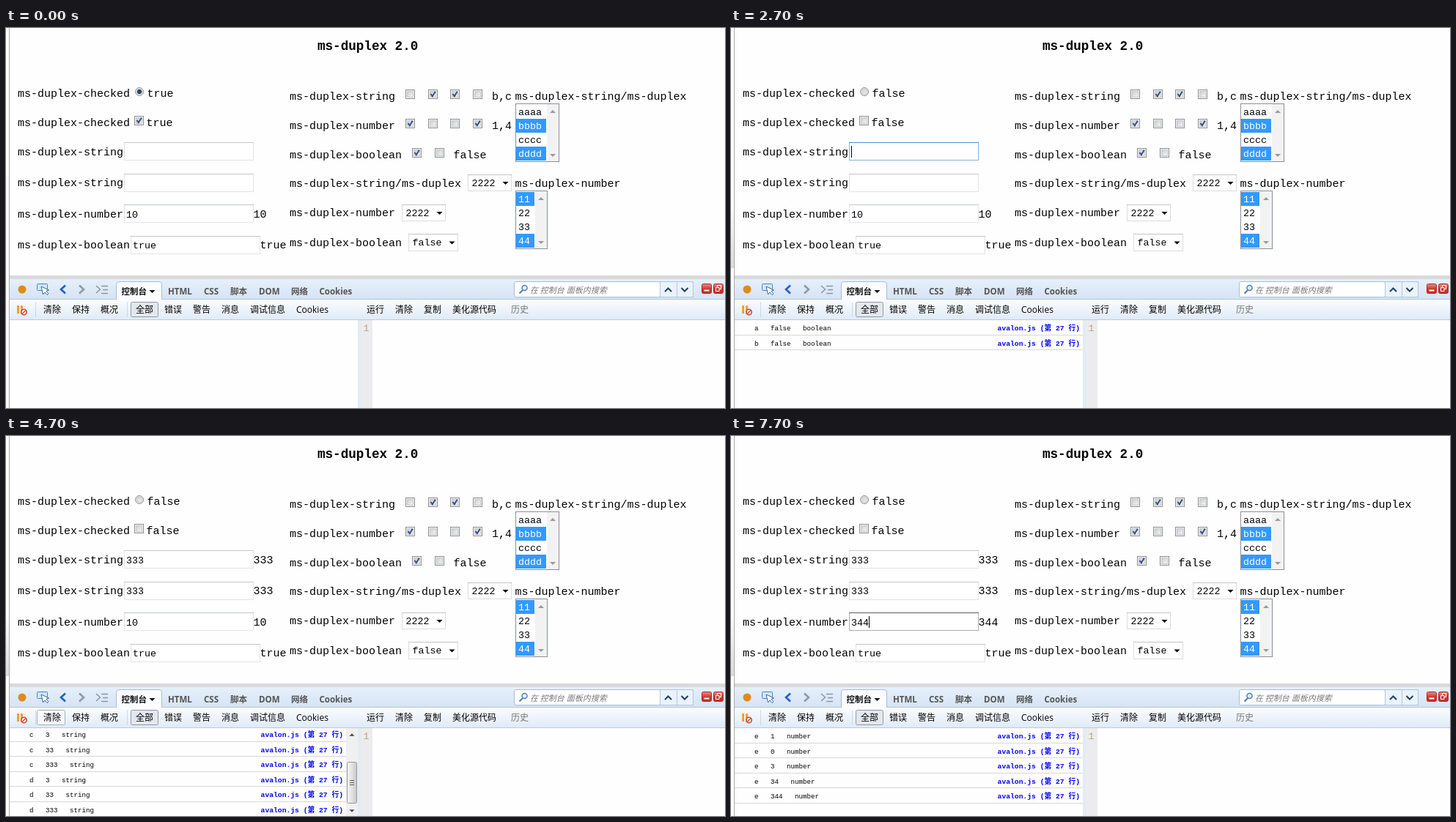
Write an HTML page that moves like this. It is 981 px wide and 519 px high and loops after 8000 ms.

```html
<!DOCTYPE html>
<html lang="en">
<head>
<meta charset="utf-8">
<title>ms-duplex 2.0</title>
<style>
  html, body { margin: 0; width: 100%; height: 100%; overflow: hidden; background: #fefefe; }
  svg { display: block; }
  text { white-space: pre; fill: #000; }
  .page { font: 15px "Liberation Mono", monospace; }
  .title { font: bold 17.6px "Liberation Mono", monospace; }
  .field { font: 13.33px "Liberation Mono", monospace; }
  .log { font: 9.17px "Liberation Mono", monospace; }
  .link { font: bold 9.7px "Liberation Mono", "Noto Sans CJK SC", monospace; fill: #00f; text-anchor: end; }
  .ui { font: 12px "Open Sans", "Noto Sans CJK SC", sans-serif; }
  .tab { font: bold 11.5px "Open Sans", "Noto Sans CJK SC", sans-serif; fill: #555; }
  .open { fill: #111; }
  .hint { font: italic 11px "Open Sans", "Noto Sans CJK SC", sans-serif; fill: #777; }
  .pick { fill: #fff; }
  .dim { fill: #777; }
  .num { fill: #c8a678; }
</style>
</head>
<body>
<svg id="stage" width="981" height="519" viewBox="0 0 981 519">
  <defs>
    <linearGradient id="tabs" x2="0" y2="1"><stop stop-color="#e6f0fb"/><stop offset="1" stop-color="#d5e3f4"/></linearGradient>
    <linearGradient id="tools" x2="0" y2="1"><stop stop-color="#fafcff"/><stop offset="1" stop-color="#dfeaf7"/></linearGradient>
    <linearGradient id="thumb"><stop stop-color="#f5f5f5"/><stop offset=".5" stop-color="#e2e2e2"/><stop offset="1" stop-color="#c8c8c8"/></linearGradient>
    <linearGradient id="box" x2="1" y2="1"><stop stop-color="#c9ccd1"/><stop offset="1" stop-color="#f6f6f6"/></linearGradient>
    <linearGradient id="hot" x2="1" y2="1"><stop stop-color="#b4def8"/><stop offset="1" stop-color="#eef9ff"/></linearGradient>
    <linearGradient id="down" x2="1" y2="1"><stop stop-color="#7fb6d8"/><stop offset="1" stop-color="#c9e6f6"/></linearGradient>
    <linearGradient id="red" x2="0" y2="1"><stop stop-color="#ee8d84"/><stop offset=".5" stop-color="#d33a31"/><stop offset="1" stop-color="#c22c28"/></linearGradient>
    <linearGradient id="edge" x2="0" y2="1"><stop stop-color="#fefefe"/><stop offset="1" stop-color="#dcdcdc"/></linearGradient>
    <clipPath id="console"><rect x="5" y="399" width="475" height="120"/></clipPath>
  </defs>
  <g id="still"></g>
  <g id="live"></g>
</svg>
<script>
const LOOP = 8000;

// drawing helpers
const rect = (x, y, w, h, fill, stroke, r = 0) =>
  `<rect x="${x}" y="${y}" width="${w}" height="${h}" rx="${r}" fill="${fill}" stroke="${stroke || 'none'}"/>`;
const frame = (x, y, w, h, fill, stroke, r) => rect(x + .5, y + .5, w - 1, h - 1, fill, stroke, r);
const disc = (cx, cy, r, fill, stroke = 'none', width = 1) =>
  `<circle cx="${cx}" cy="${cy}" r="${r}" fill="${fill}" stroke="${stroke}" stroke-width="${width}"/>`;
const path = (d, stroke, width = 1, fill = 'none') =>
  `<path d="${d}" fill="${fill}" stroke="${stroke}" stroke-width="${width}"/>`;
const text = (x, y, str, cls = 'page') => `<text x="${x}" y="${y}" class="${cls}">${str}</text>`;
const arrow = (x, y, size, fill, dir = 1) =>
  path(`M${x - size} ${y - dir * size / 2}h${2 * size}l${-size} ${dir * size}z`, 'none', 0, fill);
const dots = (x, y1, y2) => `<path d="M${x} ${y1}V${y2}" stroke="#a9bacd" stroke-dasharray="1 1"/>`;

const FILLS = ['url(#box)', 'url(#hot)', 'url(#down)'];

function checkbox(cx, cy, on, heat = 0) {
  return frame(cx - 6.5, cy - 6.5, 13, 13, '#f4f4f4', heat ? '#4c8fb8' : '#8e8f8f')
    + frame(cx - 4.5, cy - 4.5, 9, 9, FILLS[heat], heat ? '#8cc4e6' : '#c4c8cc')
    + (on ? path(`M${cx - 3} ${cy - .5}l2.3 3.2l4 -6.4`, '#3a4c86', 2) : '');
}

function radio(cx, cy, on, heat) {
  return disc(cx, cy, 5.5, '#f4f4f4', heat ? '#3f83ad' : '#8e8f8f')
    + disc(cx, cy, 3.9, FILLS[heat], heat ? '#8cc4e6' : '#c4c8cc')
    + (on ? disc(cx, cy, 2.6, heat ? '#2b86b5' : '#23506f', '#16374f') : '');
}

function input(x, y, [top, side]) {
  return frame(x, y, 177, 25, '#fff', side) + path(`M${x} ${y + .5}h177`, top);
}

function select(x, y, w, h, value) {
  return frame(x, y, w, h, '#fff', '#dcdcdc') + path(`M${x} ${y + .5}h${w}`, '#c4c4c4')
    + text(x + 5.5, y + 16, value, 'field') + arrow(x + w - 8.5, y + h / 2 + .5, 4, '#000');
}

function list(x, y, w, items, picked) {
  const bar = x + w - 17;
  return frame(x, y, w, 80, '#fff', '#8a8f98') + rect(bar, y + 1, 16, 78, '#f2f2f2')
    + arrow(bar + 8, y + 11, 4, '#999', -1) + arrow(bar + 8, y + 71, 4, '#999')
    + items.map((s, i) => (picked.includes(i) ? rect(x + 1, y + 2 + 19 * i, w - 19, 19, '#39f') : '')
      + text(x + 4, y + 16 + 19 * i, s, picked.includes(i) ? 'field pick' : 'field')).join('');
}

const PLAIN = ['#c4c6c9', '#e2e3ea'];

function pageArea() {
  const labels = [
    [16, 94, 'checked'], [16, 134, 'checked'], [16, 174, 'string'], [16, 216, 'string'],
    [16, 259, 'number'], [16, 301, 'boolean'],
    [387, 98, 'string'], [387, 138, 'number'], [387, 178, 'boolean'],
    [387, 217, 'string/ms-duplex'], [387, 257, 'number'], [387, 298, 'boolean'],
    [694.5, 98, 'string/ms-duplex'], [694.5, 217, 'number']
  ];
  const boxes = [
    [[551.5, 582.5, 612.5, 643.5], 90.5, [1, 2]],
    [[551.5, 582.5, 612.5, 643.5], 130.5, [0, 3]],
    [[560.5, 591.5], 170.5, [0]]
  ];
  return text(425, 30, 'ms-duplex 2.0', 'title')
    + labels.map(([x, y, s]) => text(x, y, 'ms-duplex-' + s)).join('')
    + boxes.map(([xs, y, on]) => xs.map((x, i) => checkbox(x, y, on.includes(i))).join('')).join('')
    + text(663, 98, 'b,c') + text(663, 138, '1,4') + text(610.5, 178, 'false')
    + input(170, 284, PLAIN) + text(173, 301, 'true', 'field') + text(346.5, 301, 'true')
    + select(630, 200, 60, 23, '2222') + select(540, 241, 60, 23, '2222') + select(549, 281, 68, 24, 'false')
    + list(695, 103, 60, ['aaaa', 'bbbb', 'cccc', 'dddd'], [1, 3])
    + list(695, 222, 44, ['11', '22', '33', '44'], [0, 3]);
}

function tabBar() {
  const tabs = [[221, 'HTML'], [270, 'CSS'], [306, '脚本'], [345, 'DOM'], [389, '网络'], [427.5, 'Cookies']];
  const navy = '#1f3f66', slate = '#8b96a3';
  return rect(5, 338, 976, 5, '#d9d9d9') + rect(5, 343, 976, 28, 'url(#tabs)')
    + path('M5 370.5H981', '#b3c6dc')
    + path('M150.5 371V350q0 -3.5 3.5 -3.5h55q3.5 0 3.5 3.5V371', '#a9bdd4', 1, '#fafcff')
    + disc(22, 357, 5.5, '#e08a1e')
    + frame(42, 349, 15, 10, '#d3e6f8', '#4b83bf', 1)
    + path('M48 353l2.5 11l2.5 -3l3 3.5l2 -1.7l-3 -3.5l3.5 -1.3z', '#2b69ae', 1, '#fff')
    + path('M81 351.5l-6 5.5l6 5.5', '#1f5fc0', 2.6)
    + path('M100 351.5l6 5.5l-6 5.5', '#8f9aa8', 2.6)
    + path('M123 352l5.5 5l-5.5 5', slate, 1.5)
    + path('M130 352.5h9M132 357.5h7M130 362.5h9', slate, 1.3)
    + text(157.5, 364, '控制台', 'tab open') + arrow(199.5, 360, 4, '#111')
    + tabs.map(([x, s]) => text(x, 364, s, 'tab')).join('')
    + frame(693, 346, 200, 22, '#fff', '#a9bdd3', 2)
    + disc(707.5, 355, 3.5, '#e6f2fd', '#4b7fb8', 1.5) + path('M705 358l-4.5 4.5', '#4b7fb8', 2)
    + text(715, 361.5, '在 控制台 面板内搜索', 'hint')
    + frame(892, 346, 24, 22, '#eaf2fb', '#b4c6da') + frame(915, 346, 23, 22, '#eaf2fb', '#b4c6da')
    + path('M899 360l4.5 -4.5l4.5 4.5', navy, 2) + path('M921.5 355l4.5 4.5l4.5 -4.5', navy, 2)
    + frame(949, 349, 14, 14, 'url(#red)', '#a82a28', 2) + path('M952.5 358.5h7', '#fff', 2)
    + frame(965, 349, 14, 14, 'url(#red)', '#a82a28', 2)
    + path('M970.5 354v-2.5h5v5h-2.5M968.5 354.5h4.5v5h-4.5z', '#fff');
}

function toolBar() {
  const items = [[90, '保持'], [129, '概况'], [216, '错误'], [255, '警告'], [294, '消息'],
    [333, '调试信息'], [396, 'Cookies'], [492, '运行'], [531, '清除'], [570, '复制'], [609, '美化源代码']];
  return rect(5, 371, 976, 28, 'url(#tools)') + path('M5 398.5H981', '#b9cbe0')
    + rect(15, 379, 3, 11, '#f0a22e') + rect(20, 379, 3, 11, '#f0a22e')
    + disc(24.5, 388, 3.7, '#fff', '#d8432e', 1.6) + path('M22 390.5l5 -5', '#d8432e', 1.5)
    + dots(40.5, 375, 395) + dots(165.5, 375, 395)
    + frame(170, 374, 38, 21, '#e3e8ee', '#8f9ba8', 2) + text(177, 389, '全部', 'ui')
    + items.map(([x, s]) => text(x, 389, s, 'ui')).join('') + text(689, 389, '历史', 'ui dim')
    + rect(480, 399, 501, 120, '#fefefe') + rect(480, 399, 4, 120, '#e3ebf4') + rect(484, 399, 16, 120, '#ececee')
    + text(487.5, 414, '1', 'field num');
}

const LOG = ['a false boolean', 'b false boolean', 'c 3 string', 'c 33 string', 'c 333 string',
  'd 3 string', 'd 33 string', 'd 333 string',
  'e 1 number', 'e 0 number', 'e 3 number', 'e 34 number', 'e 344 number'].map(s => s.split(' '));

function consoleArea(from, to) {
  const rows = LOG.slice(from, to), total = rows.length * 20.5;
  const scroll = Math.max(0, total - 121), right = scroll ? 464 : 480;
  const lines = rows.map(([key, value, type], i) => {
    const top = 399 + 20.5 * i - scroll, base = Math.round(top) + 14;
    return text(32, base, key, 'log') + text(54, base, value, 'log')
      + text(70.5 + 5.5 * value.length, base, type, 'log')
      + text(right - 4, base, 'avalon.js (第 27 行)', 'link')
      + path(`M5 ${Math.floor(top) + 20.5}H${right}`, '#d7d7d7');
  }).join('');
  const size = Math.round(86 * 109 / total);
  const bar = scroll ? rect(464, 399, 16, 120, '#f0f0f0')
    + arrow(472, 408, 3.5, '#444', -1) + arrow(472, 512, 3.5, '#444')
    + frame(465, 502 - size, 14, size, 'url(#thumb)', '#979797', 2)
    + [-3, 0, 3].map(d => path(`M469 ${Math.round(502 - size / 2) + d - .5}h6`, '#555')).join('') : '';
  return `<g clip-path="url(#console)">${lines}${bar}</g>`;
}

// input borders: [top, other sides]
const BLUE = ['#4a8fc9', '#86b4da'], DEEP = ['#3d7bad', '#569de5'];
const GREY = ['#929292', '#c0c0c0'], DARK = ['#5e5e5e', '#adadad'];

// each step changes part of the state and holds until the next one
const STEPS = [
  [0, { radio: 1, radioHeat: 0, check: 1, checkHeat: 0, values: ['', '', '10'],
        focus: -1, ring: PLAIN, caret: -1, from: 0, to: 0, clear: 0 }],
  [1100, { radioHeat: 1 }],
  [1300, { radio: 0, to: 1 }],
  [1500, { radioHeat: 0 }],
  [1600, { checkHeat: 1 }],
  [1900, { checkHeat: 2 }],
  [2000, { check: 0, checkHeat: 1, to: 2 }],
  [2200, { checkHeat: 0 }],
  [2700, { focus: 0, caret: 0, ring: BLUE }],
  [2800, { ring: DEEP }],
  [3000, { values: ['3', '', '10'], to: 3 }],
  [3200, { values: ['33', '', '10'], to: 4 }],
  [3400, { values: ['333', '', '10'], to: 5 }],
  [3500, { ring: BLUE }],
  [3600, { focus: 1, caret: 1, ring: PLAIN }],
  [3700, { ring: GREY }],
  [3800, { values: ['333', '3', '10'], ring: DARK, to: 6 }],
  [4000, { values: ['333', '33', '10'], to: 7 }],
  [4200, { values: ['333', '333', '10'], to: 8 }],
  [4300, { ring: GREY }],
  [4400, { ring: PLAIN }],
  [4600, { caret: -1 }],
  [4700, { clear: 1 }],
  [5100, { clear: 2, caret: 1 }],
  [5200, { clear: 0, from: 8 }],
  [5500, { focus: 2, caret: 2, ring: GREY }],
  [5700, { ring: DARK }],
  [6100, { values: ['333', '333', '1'], to: 9 }],
  [6200, { values: ['333', '333', '0'], to: 10 }],
  [6700, { caret: -1 }],
  [7200, { values: ['333', '333', '3'], caret: 2, to: 11 }],
  [7500, { values: ['333', '333', '34'], to: 12 }],
  [7700, { values: ['333', '333', '344'], to: 13 }]
];

function leftEdge(moved) {
  return (moved ? rect(0, 240, 4, 88, 'url(#edge)') : rect(0, 203, 4, 316, '#f8f8f8'))
    + path('M4.5 0V519', '#a8a8a8');
}

function draw(s) {
  const fields = [[156, 174], [199, 216], [241, 259]].map(([y, base], i) => {
    const value = s.values[i], x = 164.5 + 8 * value.length;
    return input(161, y, s.focus === i ? s.ring : PLAIN)
      + text(164, base, value, 'field') + text(337.5, base, value)
      + (s.caret === i ? path(`M${x} ${base - 13}v16`, '#000') : '');
  }).join('');
  return leftEdge(s.to > 0)
    + radio(182, 87, s.radio, s.radioHeat) + text(192.5, 94, !!s.radio)
    + checkbox(181.5, 126.5, s.check, s.checkHeat) + text(191.5, 134, !!s.check)
    + fields
    + (s.clear ? frame(42, 374, 39, 21, s.clear > 1 ? '#e3e8ee' : '#f7fafd', '#a3afbc', 2) : '')
    + text(51, 389, '清除', 'ui')
    + consoleArea(s.from, s.to);
}

document.getElementById('still').innerHTML = pageArea() + tabBar() + toolBar();
const live = document.getElementById('live');
const start = performance.now();
let shown = 0;

function tick() {
  const t = (performance.now() - start) % LOOP;
  const past = STEPS.filter(([ms]) => ms <= t);
  if (past.length !== shown) {
    shown = past.length;
    live.innerHTML = draw(Object.assign({}, ...past.map(([, change]) => change)));
  }
  requestAnimationFrame(tick);
}
tick();
</script>
</body>
</html>
```
